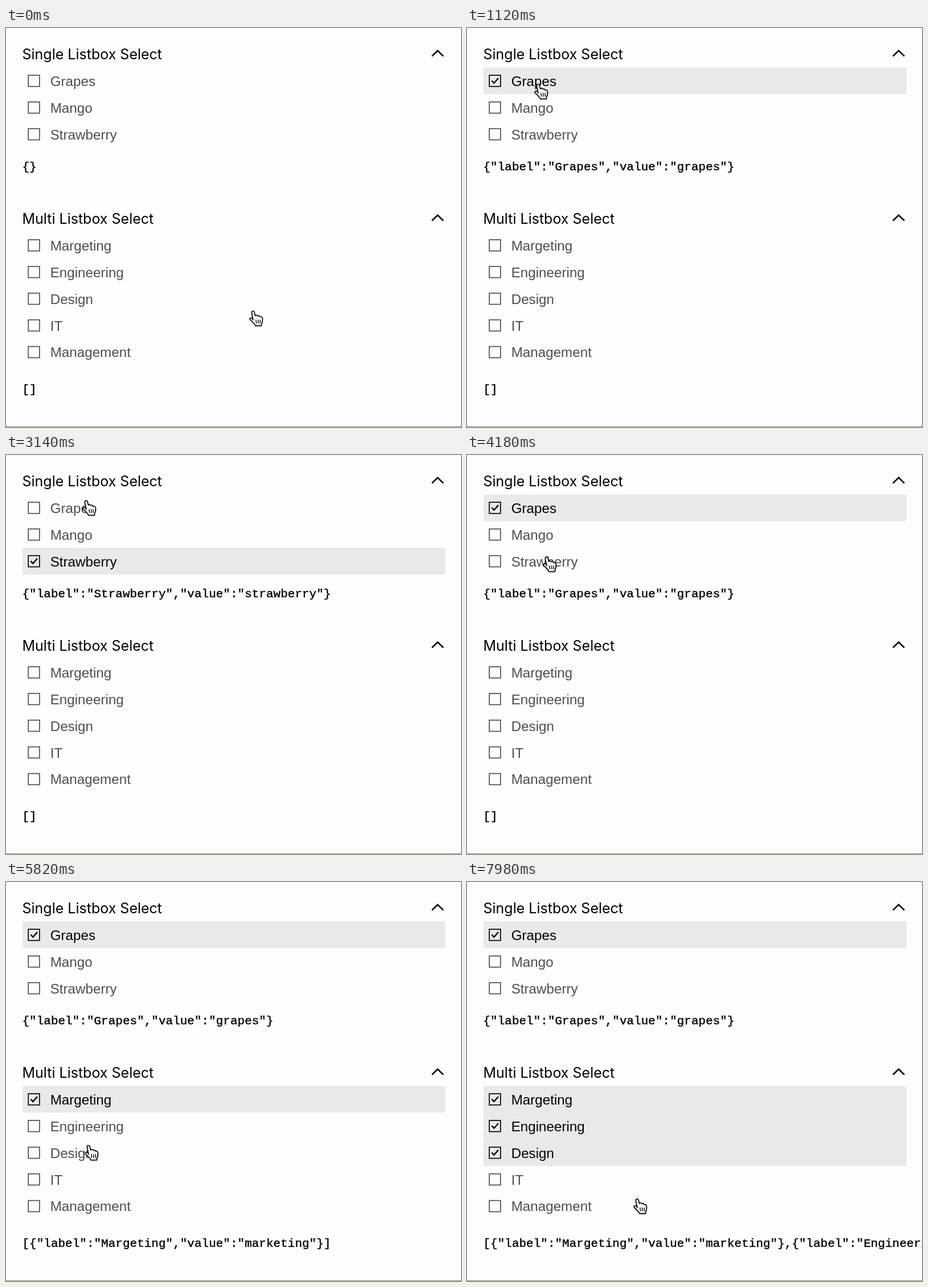
These frames come from a looping animation (799x701 px, 8 s). An HTML page:

```html
<!DOCTYPE html>
<html lang="en">
<head>
<meta charset="utf-8">
<title>Listbox select</title>
<style>
  html, body { margin: 0; width: 100%; height: 100%; overflow: hidden; background: #fdfdfc; }
  svg { display: block; width: 799px; height: 701px; }
  .title { font: 25px Inter, "Open Sans", sans-serif; fill: #000; }
  .label { font: 24.2px "Liberation Sans", Arial, sans-serif; fill: #4f4f4f; }
  .json { font: 21px "Liberation Mono", "Courier New", monospace; fill: #000; stroke: #000; stroke-width: .4; white-space: pre; }
  .chevron { fill: none; stroke: #000; stroke-width: 2.6; }
  .band { fill: #e9e9e9; visibility: hidden; }
  .box { fill: none; stroke: #4f4f4f; stroke-width: 1.7; }
  .tick { fill: none; stroke: #000; stroke-width: 2.4; visibility: hidden; }
  .on .band, .on .tick { visibility: visible; }
  .on .label { fill: #000; }
  .on .box { stroke: #000; }
  #hand { filter: drop-shadow(0 1px 1px rgba(0, 0, 0, .3)); }
</style>
</head>
<body>
<svg viewBox="0 0 799 701">
  <g id="lists"></g>
  <rect y="700" width="799" height="1" fill="#8a8765"/>
  <g id="hand" stroke="#000" stroke-linecap="round" stroke-linejoin="round">
    <path fill="#fff" stroke-width="1.6" d="M-5 3L-7.5-9.5C-8-13-3.8-14-3-10.8L-1.3-4.5C0-6.5 3-5.5 3-3.8C4.5-5.3 7-4 7.2-2.3C9-3.5 11-2 11.3 0C12 4 11 7 9.5 10V13H-1C-2 10-5 7.5-10.5 2C-12 0-8.5-1.5-6.5.2Z"/>
    <path fill="none" stroke-width="1.4" d="M0 3L.6 8.5M3.6 3L4 8.5M7.2 3V8.5"/>
  </g>
</svg>
<script>
const LOOP = 8000;
const ROW = 46.9;
const CLICK_DELAY = 400;
const STAY = 570;

const single = {
  title: "Single Listbox Select", top: 0, jsonY: 250, multi: false,
  items: ["Grapes", "Mango", "Strawberry"]
};
const multi = {
  title: "Multi Listbox Select", top: 289, jsonY: 641, multi: true,
  items: ["Margeting", "Engineering", "Design", "IT", "Management"]
};
const lists = [single, multi];

// The pointer reaches a row, clicks it after a delay, then moves on.
const start = { at: -STAY, x: 439, y: 510 };
const visits = [
  { at: 550, list: single, row: 0.4, x: 130 },
  { at: 1440, list: single, row: 1.1, x: 146 },
  { at: 2120, list: single, row: 2, x: 157 },
  { at: 3080, list: single, row: 0, x: 146 },
  { at: 5000, list: multi, row: 0, x: 143 },
  { at: 5820, list: multi, row: 2, x: 150 },
  { at: 6900, list: multi, row: 0.93, x: 275 },
  { at: 7900, list: multi, row: 4, x: 304 }
].map(visit => ({ ...visit, y: rowTop(visit.list, visit.row + 0.5) }));
const stops = [start, ...visits];

function rowTop(list, row) {
  return list.top + 69.3 + row * ROW;
}

function add(parent, tag, attrs = {}, text = "") {
  const node = document.createElementNS("http://www.w3.org/2000/svg", tag);
  for (const [name, value] of Object.entries(attrs)) node.setAttribute(name, value);
  node.textContent = text;
  return parent.appendChild(node);
}

function buildRow(parent, name, y) {
  const row = add(parent, "g", { transform: `translate(0 ${y})` });
  add(row, "rect", { class: "band", x: 29, width: 742.5, height: ROW });
  add(row, "rect", { class: "box", x: 39.2, y: 13.7, width: 19.7, height: 19.7 });
  add(row, "path", { class: "tick", d: "M43.4 23.2l4 4.2 7.6-8.6" });
  add(row, "text", { class: "label", x: 77.7, y: 32.5 }, name);
  return row;
}

function buildList(list) {
  const group = add(document.getElementById("lists"), "g");
  add(group, "text", { class: "title", x: 28.5, y: list.top + 55 }, list.title);
  add(group, "path", { class: "chevron", d: `M748 ${list.top + 49.5}l10-9.6 10 9.6` });
  list.rows = list.items.map((name, i) => buildRow(group, name, rowTop(list, i)));
  list.json = add(group, "text", { class: "json", x: 28.5, y: list.jsonY });
}

function selectedAt(list, time) {
  const clicked = visits
    .filter(visit => visit.list === list && visit.at + CLICK_DELAY <= time)
    .map(visit => Math.round(visit.row));
  return list.multi ? clicked.sort((a, b) => a - b) : clicked.slice(-1);
}

function toOption(label) {
  const value = label === "Margeting" ? "marketing" : label.toLowerCase();
  return { label, value };
}

function updateList(list, time) {
  const selected = selectedAt(list, time);
  const options = selected.map(i => toOption(list.items[i]));
  const json = JSON.stringify(list.multi ? options : options[0] || {});
  if (list.json.textContent === json) return;
  list.json.textContent = json;
  list.rows.forEach((row, i) => row.classList.toggle("on", selected.includes(i)));
}

function pointerAt(time) {
  const last = stops.findLastIndex(stop => stop.at <= time);
  const from = stops[last];
  const to = stops[last + 1] || from;
  const leave = from.at + STAY;
  const p = Math.max(0, (time - leave) / (to.at - leave));
  const eased = p * p * (3 - 2 * p);
  return [from.x + (to.x - from.x) * eased, from.y + (to.y - from.y) * eased];
}

const hand = document.getElementById("hand");

function draw() {
  const time = performance.now() % LOOP;
  lists.forEach(list => updateList(list, time));
  hand.setAttribute("transform", `translate(${pointerAt(time).join(" ")})`);
  requestAnimationFrame(draw);
}

lists.forEach(buildList);
draw();
</script>
</body>
</html>
```
